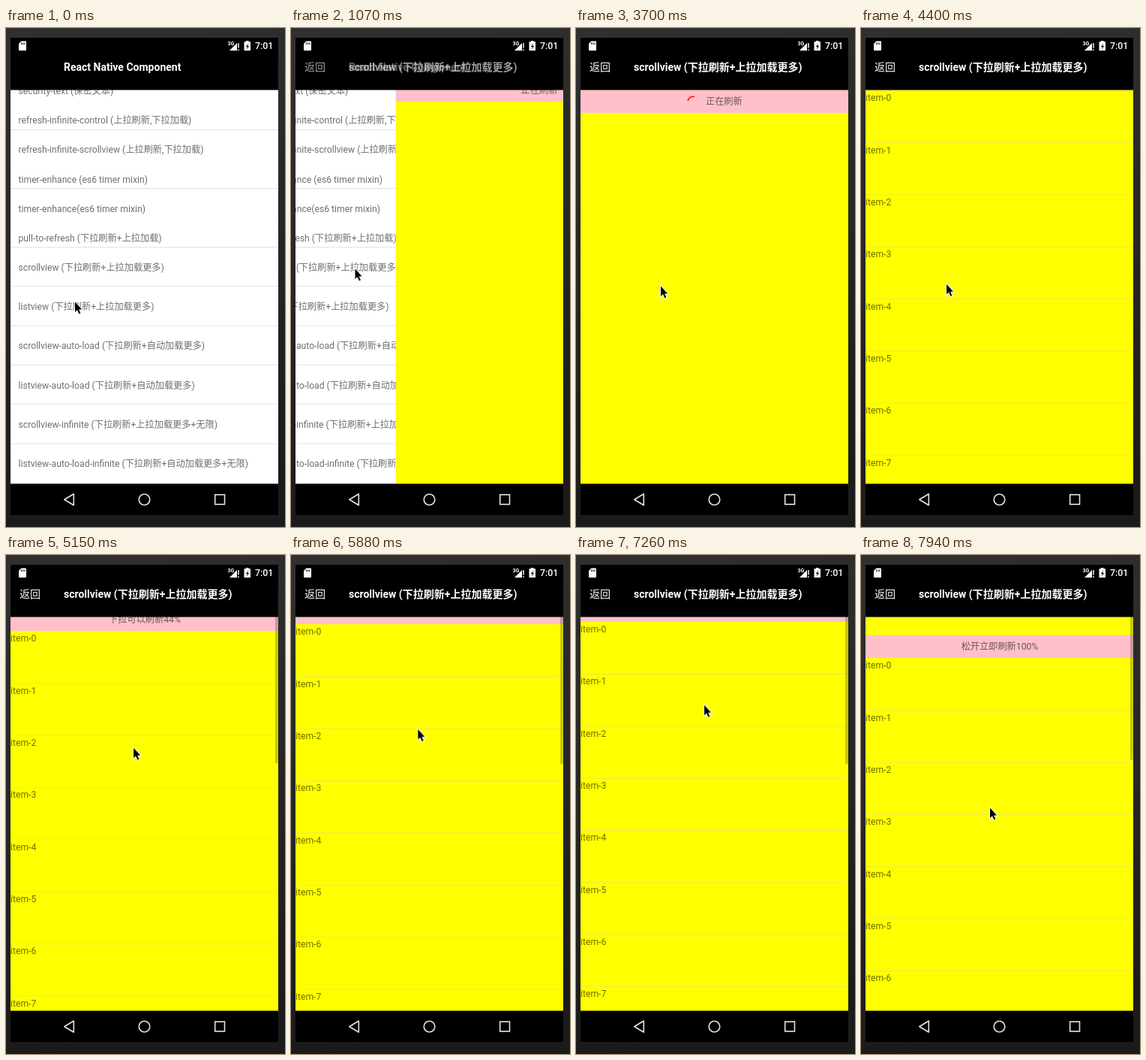
Recreate the animation shown at these times as an HTML page. Size 372 by 664 pixels, loop 8 s.

```html
<!DOCTYPE html>
<html lang="zh-CN">
<head>
<meta charset="utf-8">
<title>React Native Component</title>
<style>
  @property --push { syntax: '<number>'; inherits: true; initial-value: 0; }
  @property --pull { syntax: '<number>'; inherits: true; initial-value: 0; }

  html, body { margin: 0; width: 100%; height: 100%; overflow: hidden; background: #222; }
  svg { display: block; width: 100vw; height: 100vh; }
  text {
    font: 12.2px Roboto, "Noto Sans CJK SC", "Noto Sans CJK", sans-serif;
    fill: rgba(0, 0, 0, .57);
    white-space: pre;
  }
  .bar text { font-size: 14px; fill: #fff; }
  .bar .title { font-weight: 700; }
  .bar .clock { font-weight: 500; font-size: 12.4px; }
  .bar .network { font-weight: 700; font-size: 7px; }

  #app, .timed { animation: 8s linear infinite; }
  #app { animation-name: push, pull; }

  .home { transform: translateX(calc(var(--push) * -107px)); }
  .detail { transform: translateX(calc((1 - var(--push)) * 357px)); }
  .leaving { opacity: calc(1 - var(--push)); }
  .entering { opacity: var(--push); }
  .pulled { transform: translateY(calc(var(--pull) * 1px)); }

  .cursor { animation-name: cursor; }
  .items { animation-name: loaded; }
  .refreshing { animation-name: refreshing; }
  .loader { animation-name: loader; }
  .hint { animation-name: hint; text-anchor: middle; }
  .thumb {
    height: calc((197 - .12 * var(--pull)) * 1px);
    fill: rgba(0, 0, 0, .22);
    animation-name: thumb;
  }
  .spinner {
    fill: none; stroke: #f00; stroke-width: 1.5;
    animation: spin 2s linear infinite,
               arc calc(8s / 6) cubic-bezier(.4, 0, .2, 1) -1247ms infinite;
  }

  @keyframes push {
    0%, 11.75% { --push: 0; animation-timing-function: cubic-bezier(.4, .2, .8, .8); }
    13.2% { --push: .622; }
    13.375% { --push: .622; animation-timing-function: cubic-bezier(.2, .6, .4, 1); }
    17.5%, 100% { --push: 1; }
  }
  @keyframes pull {
    0%, 13.375% { --pull: 15; animation-timing-function: ease-out; }
    17% { --pull: 30; }
    47% { --pull: 30; animation-timing-function: ease-out; }
    52%, 59.75% { --pull: 0; }
    64.1% { --pull: 18; }
    64.375% { --pull: 18; animation-timing-function: ease-out; }
    69.5% { --pull: 34; animation-timing-function: ease-in-out; }
    75.75%, 85.625% { --pull: 0; }
    90.6% { --pull: 5; }
    98.625% { --pull: 45; }
    99.1%, 100% { --pull: 54; }
  }
  @keyframes cursor {
    0%, 4% { transform: translate(92px, 364px); animation-timing-function: ease-in-out; }
    9%, 22% { transform: translate(85.5px, 320px); animation-timing-function: ease-in-out; }
    32%, 54.5% { transform: translate(113px, 343px); animation-timing-function: ease-in-out; }
    59.75% { transform: translate(168.5px, 206.5px); }
    64.1% { transform: translate(170px, 256px); }
    64.375% { transform: translate(170px, 256px); animation-timing-function: ease-out; }
    69.5% { transform: translate(171.5px, 300px); animation-timing-function: ease-in-out; }
    75.75%, 77.5% { transform: translate(168.5px, 206.5px); }
    82% { transform: translate(167px, 195px); }
    85.625% { transform: translate(168.5px, 183px); }
    90.6% { transform: translate(171px, 197px); }
    98.625% { transform: translate(172px, 311px); }
    99.1%, 100% { transform: translate(172px, 336px); }
  }
  @keyframes loaded {
    0%, 46.99% { opacity: 0; }
    47%, 100% { opacity: 1; }
  }
  @keyframes refreshing {
    0%, 52% { opacity: 1; }
    52.01%, 100% { opacity: 0; }
  }
  @keyframes loader {
    0%, 13.9% { opacity: 0; }
    14%, 100% { opacity: 1; }
  }
  @keyframes hint {
    0%, 52% { opacity: 0; }
    52.01%, 100% { opacity: 1; }
  }
  @keyframes thumb {
    0%, 59.5% { opacity: 0; }
    60%, 77.5% { opacity: 1; }
    81.5%, 85.5% { opacity: 0; }
    86%, 100% { opacity: 1; }
  }
  @keyframes spin {
    from { transform: rotate(6deg); }
    to { transform: rotate(366deg); }
  }
  @keyframes arc {
    0% { stroke-dasharray: 3 97; stroke-dashoffset: 0; }
    50% { stroke-dasharray: 75 25; stroke-dashoffset: 0; }
    100% { stroke-dasharray: 3 97; stroke-dashoffset: -100; }
  }
</style>
</head>
<body>
<svg id="app" viewBox="0 0 372 664">
  <defs>
    <linearGradient id="backdrop" x2=".15" y2="1">
      <stop offset="0" stop-color="#303030"/>
      <stop offset=".5" stop-color="#272727"/>
      <stop offset="1" stop-color="#1b1b1b"/>
    </linearGradient>
    <clipPath id="viewport"><rect x="6" y="82" width="357" height="525"/></clipPath>
  </defs>

  <rect width="372" height="664" fill="url(#backdrop)"/>
  <rect x="6" y="13" width="357" height="635"/>

  <g clip-path="url(#viewport)">
    <g class="home">
      <rect x="6" y="82" width="357" height="525" fill="#fff"/>
      <g id="menu"></g>
    </g>
    <g class="detail">
      <rect x="6" y="82" width="357" height="525" fill="#ff0"/>
      <g class="pulled">
        <rect x="6" y="52.5" width="357" height="30.5" fill="#ffc0cb"/>
        <g class="refreshing timed">
          <g class="loader timed">
            <g transform="translate(156 68)"><circle class="spinner" r="6.8" pathLength="100"/></g>
          </g>
          <text x="173" y="72.3">正在刷新</text>
        </g>
        <text id="hint" class="hint timed" x="185" y="72.3"></text>
        <g id="items" class="items timed"></g>
      </g>
      <rect class="thumb timed" x="359" y="82" width="4"/>
    </g>
    <path d="M6 82.5H363M6 606.5H363" stroke="#000" stroke-opacity=".5"/>
  </g>

  <g class="bar">
    <path d="M20.5 17.5H26q1 0 1 1V29q0 1-1 1H18q-1 0-1-1V21z" fill="#fff"/>
    <path d="M20.5 19.5v2.5M22.7 19.5v2.5M24.9 19.5v2.5" stroke="#000"/>
    <text class="network" x="295.5" y="23">3G</text>
    <path d="M298 30 308 20v10z" fill="#fff"/>
    <path d="M310 20v6.5M310 28.2v1.8" stroke="#fff" stroke-width="1.4"/>
    <path d="M320 18.3V17h3.5v1.3H326V30h-8.5V18.3z" fill="#fff"/>
    <path d="M323.3 20.5 319.8 25h2l-1 3.5 3.3-4.5h-2z"/>
    <text class="clock" x="332" y="28.3">7:01</text>
    <text class="title leaving" x="77" y="56.8">React Native Component</text>
    <g class="entering">
      <text x="18" y="57">返回</text>
      <text class="title" x="77" y="56.8">scrollview (下拉刷新+上拉加载更多)</text>
    </g>
  </g>

  <g fill="none" stroke="#e4e4e4" stroke-width="1.6">
    <path d="M77.8 627.5 90.3 620v15z" stroke-linejoin="round"/>
    <circle cx="184.5" cy="627.5" r="7.3"/>
    <rect x="278.7" y="621" width="12.8" height="12.8"/>
  </g>

  <path class="cursor timed" d="M0 .5V14L3 11.2 5.4 16.4 7.4 15.5 5.1 10.4H9.2z"
        stroke="#fff" stroke-width="2" paint-order="stroke"/>
</svg>
<script>
  const byId = id => document.getElementById(id);

  function add(parent, tag, attrs, content = '') {
    const node = document.createElementNS('http://www.w3.org/2000/svg', tag);
    for (const name in attrs) node.setAttribute(name, attrs[name]);
    node.textContent = content;
    parent.append(node);
  }
  const label = (parent, x, y, content) => add(parent, 'text', { x, y }, content);
  const divider = (parent, y, stroke) => add(parent, 'path', { d: `M6 ${y}H363`, stroke });

  const compactRows = [
    'security-text (保密文本)',
    'refresh-infinite-control (上拉刷新,下拉加载)',
    'refresh-infinite-scrollview (上拉刷新,下拉加载)',
    'timer-enhance (es6 timer mixin)',
    'timer-enhance(es6 timer mixin)',
    'pull-to-refresh (下拉刷新+上拉加载)',
  ];
  const rows = [
    'scrollview (下拉刷新+上拉加载更多)',
    'listview (下拉刷新+上拉加载更多)',
    'scrollview-auto-load (下拉刷新+自动加载更多)',
    'listview-auto-load (下拉刷新+自动加载更多)',
    'scrollview-infinite (下拉刷新+上拉加载更多+无限)',
    'listview-auto-load-infinite (下拉刷新+自动加载更多+无限)',
  ];

  const menu = byId('menu');
  compactRows.forEach((name, i) => {
    label(menu, 16.5, 88.2 + 39.1 * i, name);
    if (i % 2) divider(menu, 96.3 + 39.1 * i, '#dedede');
  });
  rows.forEach((name, i) => {
    label(menu, 16.5, 322.7 + 52.35 * i, name);
    divider(menu, 343.7 + 52.35 * i, '#e4e4e4');
  });

  const items = byId('items');
  for (let i = 0; i < 8; i++) {
    label(items, 6, 97.2 + 69.33 * i, `item-${i}`);
    divider(items, 152.7 + 69.33 * i, 'rgba(200, 200, 200, .4)');
  }

  // The hint follows the animated pull distance.
  const hint = byId('hint');
  const appStyle = getComputedStyle(byId('app'));
  const fullPull = 41;

  function tick() {
    const pull = Number(appStyle.getPropertyValue('--pull'));
    const percent = Math.min(100, Math.round(pull / fullPull * 100));
    hint.textContent = `${percent < 100 ? '下拉可以刷新' : '松开立即刷新'}${percent}%`;
    requestAnimationFrame(tick);
  }
  requestAnimationFrame(tick);
</script>
</body>
</html>
```
